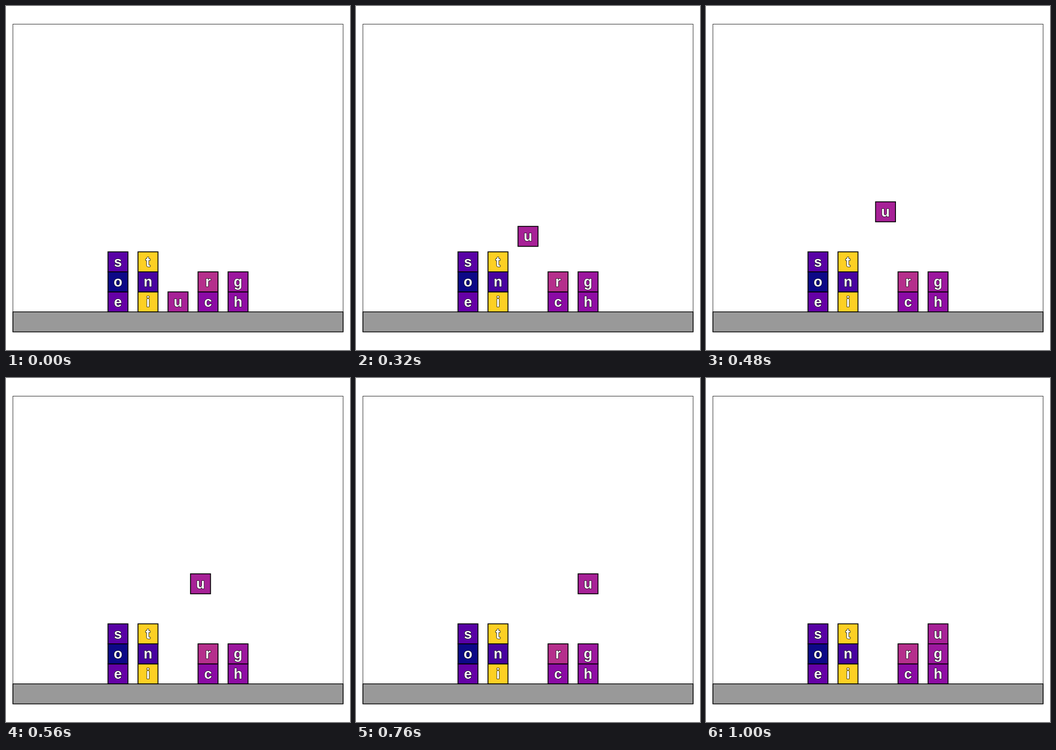
Animation, 748 px wide and 748 px high, one loop 1040 ms. Source, as an HTML page:

```html
<!DOCTYPE html>
<html lang="en">
<head>
<meta charset="utf-8">
<title>Letter blocks</title>
<style>
  html, body { margin: 0; width: 100%; height: 100%; overflow: hidden; background: #fff; }
  svg { display: block; width: 748px; height: 748px; }
  .block rect { stroke: #000; stroke-width: 1.9; }
  .block text {
    font: bold 31px "Liberation Sans", Arial, sans-serif;
    text-anchor: middle;
    fill: #fff;
    stroke: #000;
    stroke-width: 1.7;
    stroke-linejoin: round;
    paint-order: stroke;
  }
  /* 26 ticks of 40 ms: 11 up, 8 across, 6 down, then one at rest */
  #mover { animation: carry 1040ms infinite; }
  @keyframes carry {
    0% { transform: translate(0, 0); animation-timing-function: steps(11); }
    42.3% { transform: translate(0, -195.84px); animation-timing-function: steps(8); }
    73.07% { transform: translate(130.56px, -195.84px); animation-timing-function: steps(6); }
    96.15%, 100% { transform: translate(130.56px, -87.04px); }
  }
</style>
</head>
<body>
<svg id="stage" viewBox="0 0 748 748">
  <rect x="15" y="665.1" width="718" height="43.5" fill="#999" stroke="#000" stroke-width="1.6"/>
  <g id="blocks"></g>
  <rect x="15" y="39.5" width="718" height="669.1" fill="none" stroke="#000" stroke-opacity=".85" stroke-width="1.1"/>
</svg>
<script>
  const UNIT = 21.76, SIZE = 2 * UNIT, FLOOR = 665.1, LEFT = 221.7;
  const COLORS = {
    s: '#5901a5', o: '#0d0887', e: '#6600a7',
    t: '#fdd024', n: '#4903a0', i: '#fdd024',
    u: '#a72197', r: '#b52f8c', c: '#8b0aa5',
    g: '#9c179e', h: '#8f0da4'
  };
  // Each stack is listed from the bottom up
  const STACKS = ['eos', 'int', 'u', 'cr', 'hg'];

  function add(parent, tag, attrs) {
    const el = document.createElementNS('http://www.w3.org/2000/svg', tag);
    for (const key in attrs) el.setAttribute(key, attrs[key]);
    return parent.appendChild(el);
  }

  function addBlock(letter, x, y) {
    const block = add(document.getElementById('blocks'), 'g', { class: 'block' });
    add(block, 'rect', { x, y, width: SIZE, height: SIZE, fill: COLORS[letter] });
    add(block, 'text', { x: x + SIZE / 2, y: y + SIZE / 2 + 10.5 }).textContent = letter;
    return block;
  }

  STACKS.forEach((stack, col) => {
    [...stack].forEach((letter, row) => {
      const block = addBlock(letter, LEFT + col * 3 * UNIT, FLOOR - (row + 1) * SIZE);
      if (letter === 'u') block.id = 'mover';
    });
  });
  document.getElementById('blocks').append(document.getElementById('mover'));
</script>
</body>
</html>
```
